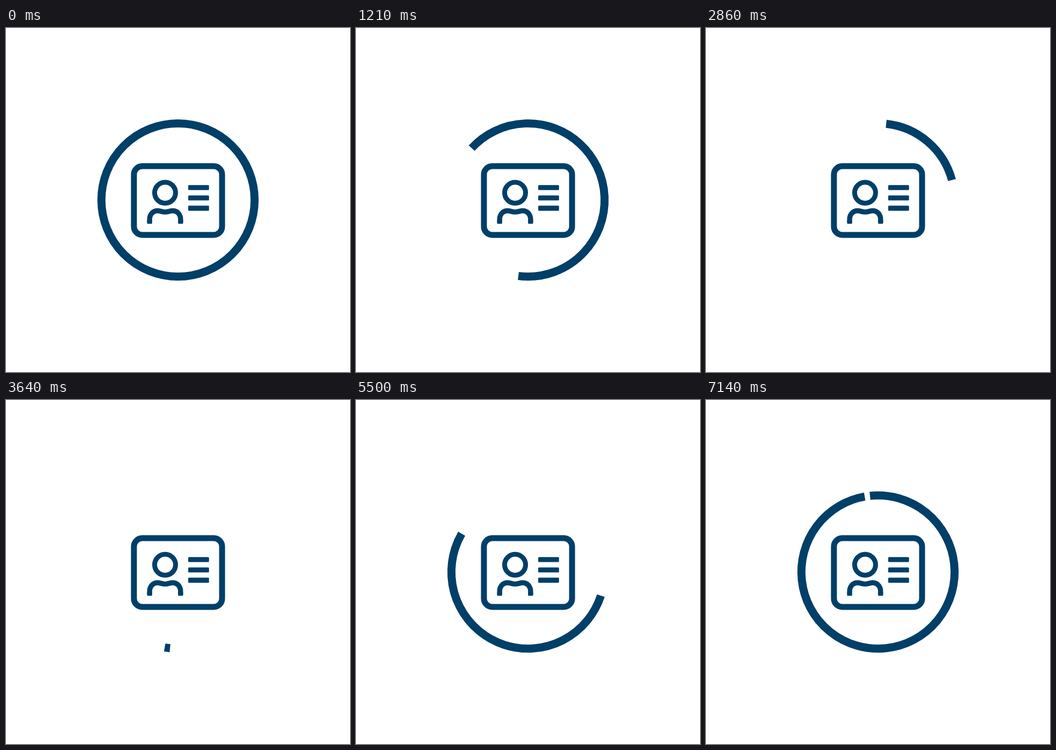
Recreate the animation shown at these times as an HTML page with a canvas. Size 640x640 px, loop 7.21 s.

```html
<!DOCTYPE html>
<html lang="en">
<head>
<meta charset="utf-8">
<title>ID card loader</title>
<style>
  html, body { margin: 0; width: 100%; height: 100%; overflow: hidden; background: #fff; }
  canvas { display: block; width: 640px; height: 640px; }
</style>
</head>
<body>
<canvas id="stage" width="640" height="640"></canvas>
<script>
const canvas = document.getElementById('stage');
const ctx = canvas.getContext('2d');
const ratio = window.devicePixelRatio || 1;
canvas.width = canvas.height = 640 * ratio;
ctx.scale(ratio, ratio);

const INK = '#003f68';
const LOOP = 7210;   // ms
const FPS = 14;      // displayed steps per second
const RATE = 25;     // motion is keyed at 25 steps per second
const HALF = 90;     // motion steps until the ring is gone

function box(x, y, w, h, r) {
  ctx.beginPath();
  ctx.roundRect(x, y, w, h, r);
}

function bar(x, y, w, h) {
  box(x, y, w, h, 1.5);
  ctx.fill();
}

function drawCard() {
  ctx.lineWidth = 11;
  box(238, 257, 164, 128, 15.5);
  ctx.stroke();

  ctx.lineWidth = 9;
  ctx.beginPath();
  ctx.arc(296, 306.5, 19.5, 0, Math.PI * 2);
  ctx.stroke();

  // shoulders
  ctx.lineWidth = 9.4;
  ctx.beginPath();
  ctx.moveTo(267.2, 361);
  ctx.lineTo(267.2, 356);
  ctx.bezierCurveTo(267.2, 346.5, 273.5, 340, 282, 340);
  ctx.bezierCurveTo(287.5, 340, 289.5, 342.4, 296, 342.4);
  ctx.bezierCurveTo(302.5, 342.4, 304.5, 340, 310, 340);
  ctx.bezierCurveTo(318.5, 340, 324.8, 346.5, 324.8, 356);
  ctx.lineTo(324.8, 361);
  ctx.stroke();
  bar(262.5, 357, 9.4, 7.3);
  bar(320.1, 357, 9.4, 7.3);

  for (let i = 0; i < 3; i++) bar(339, 292.2 + i * 19.2, 38.7, 9.4);
}

// Start and end of the ring in degrees clockwise from the top.
function ringSpan(step) {
  if (step < HALF) {
    const end = 540 * Math.min(step / 89.4, 1);
    const gap = 360 * Math.min(step / 89, 1);
    return [end + gap, end + 360];
  }
  const start = step * 6;
  return [start, start + (step - HALF) * 4];
}

function drawRing(step) {
  const [from, to] = ringSpan(step);
  if (to - from < 0.01) return;
  const rad = deg => (deg - 90) * Math.PI / 180;
  ctx.lineWidth = 15;
  ctx.beginPath();
  ctx.arc(320, 320, 142.5, rad(from), rad(to));
  ctx.stroke();
}

function draw(t) {
  const tick = Math.floor((t + 5) * FPS / 1000);
  const step = Math.floor(tick * RATE / FPS + 0.75);
  ctx.fillStyle = '#fff';
  ctx.fillRect(0, 0, 640, 640);
  ctx.fillStyle = ctx.strokeStyle = INK;
  drawRing(step);
  drawCard();
}

const begin = performance.now();
function loop() {
  draw((performance.now() - begin) % LOOP);
  requestAnimationFrame(loop);
}
loop();
</script>
</body>
</html>
```
